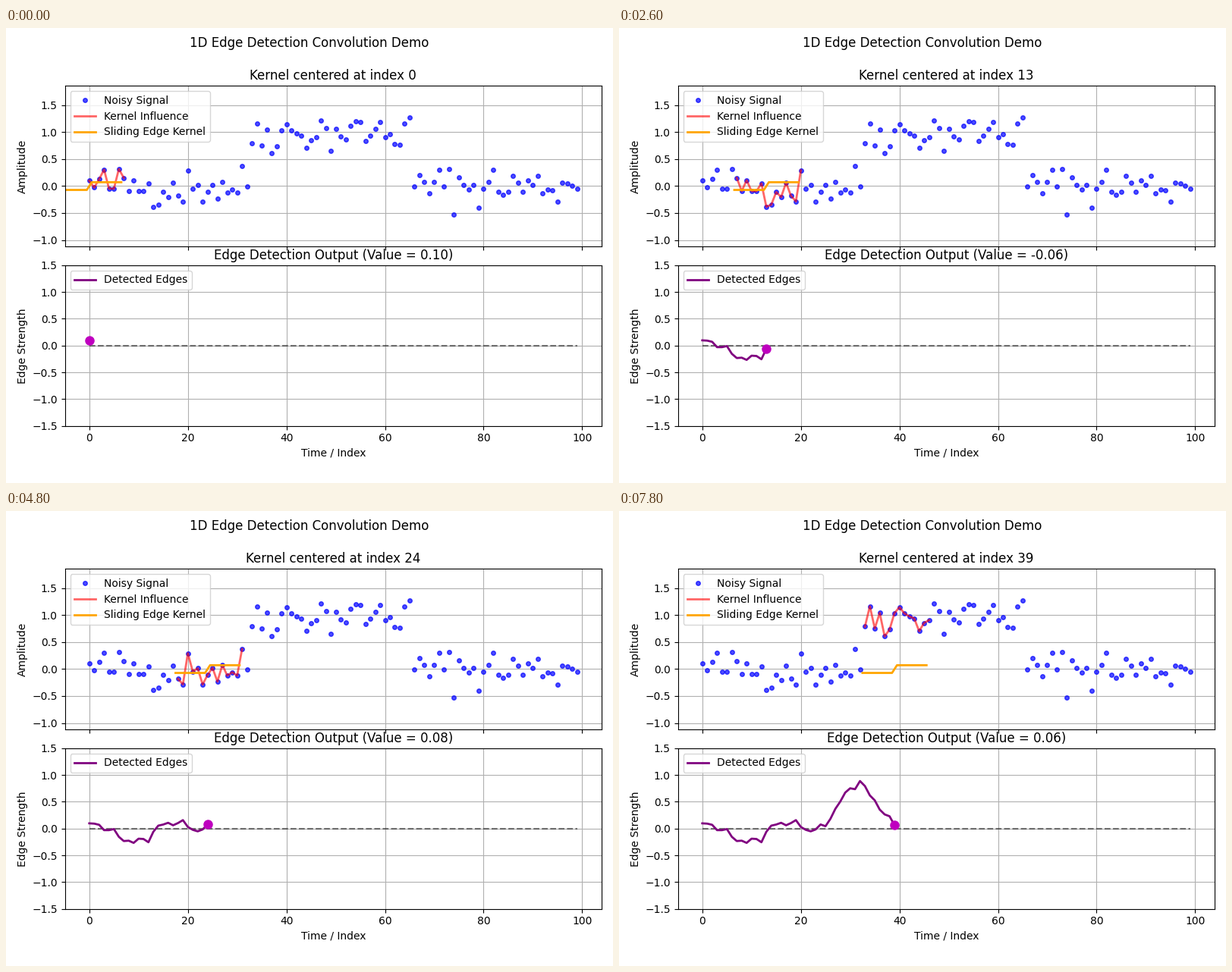
Recreate the animation shown at these times as a matplotlib script. Size 800 px wide and 600 px high, loop 8000 ms.

```python
import matplotlib.pyplot as plt
import numpy as np
from matplotlib.animation import FuncAnimation

W, H = 800, 600
N = 100
HALF = 7
STEPS = 40

np.random.seed(42)
x = np.arange(N)
signal = np.where((x >= 33) & (x < 66), 1.0, 0.0) + np.random.normal(0, 0.2, N)

# Step kernel: mean of the next 7 samples minus mean of the previous 7
kernel = np.repeat([-1.0, 1.0], HALF) / HALF
offsets = np.arange(2 * HALF) - HALF + 0.5
edges = np.correlate(np.pad(signal, (HALF - 1, HALF)), kernel, mode="valid")

fig, (top, low) = plt.subplots(2, 1, sharex=True, figsize=(W / 100, H / 100), dpi=100)
fig.subplots_adjust(left=77.6 / W, right=785 / W,
                    bottom=75.4 / H, top=523.9 / H, hspace=0.1187)
fig.suptitle("1D Edge Detection Convolution Demo", y=589 / H)

top.plot(x, signal, "bo", markersize=4, alpha=0.7, label="Noisy Signal")
influence, = top.plot([], [], "r-", lw=2, alpha=0.6, label="Kernel Influence")
slider, = top.plot([], [], color="orange", lw=2, label="Sliding Edge Kernel")
top.set_ylim(-1.116, 1.862)
top.set_ylabel("Amplitude")

low.plot(x, np.zeros(N), "k--", alpha=0.5)
trace, = low.plot([], [], color="purple", lw=2, label="Detected Edges")
dot, = low.plot([], [], "mo", markersize=8)
low.set_ylim(-1.5, 1.5)
low.set_xlabel("Time / Index")
low.set_ylabel("Edge Strength")

for ax in (top, low):
    ax.set_xlim(-4.95, 103.95)
    ax.grid(True)
    ax.legend(loc="upper left")


def update(i):
    window = slice(max(0, i - HALF + 1), i + HALF + 1)
    influence.set_data(x[window], signal[window])
    slider.set_data(i + offsets, kernel / 2)
    trace.set_data(x[:i + 1], edges[:i + 1])
    dot.set_data([i], [edges[i]])
    top.set_title(f"Kernel centered at index {i}")
    low.set_title(f"Edge Detection Output (Value = {edges[i]:.2f})")
    return influence, slider, trace, dot


anim = FuncAnimation(fig, update, frames=STEPS, interval=200,
                     repeat=True, repeat_delay=0, blit=False)
plt.show()
```
